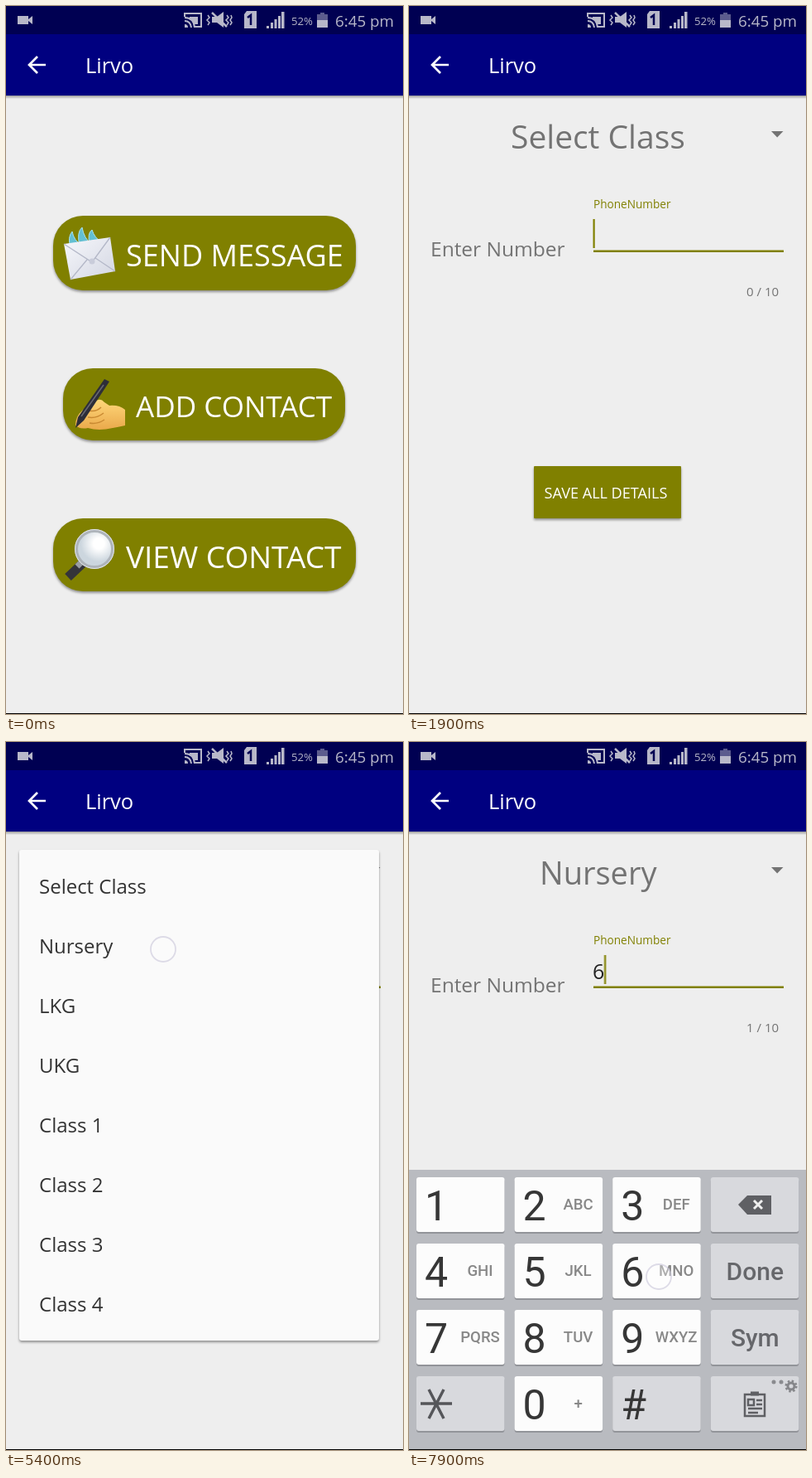
Animation, 480 px wide and 854 px high, one loop 8 s. Source, as an HTML page:

```html
<!DOCTYPE html>
<html lang="en">
<head>
<meta charset="utf-8">
<title>Contact form</title>
<style>
html, body { margin: 0; width: 100%; height: 100%; overflow: hidden; background: #eee; }
svg { display: block; width: 100vw; height: 100vh; }
text { font-family: "Open Sans", "Noto Sans", sans-serif; white-space: pre; }
.olive { fill: #808000; }
.raised { filter: drop-shadow(0 2px 1.5px rgba(0, 0, 0, .4)); }
.grey { fill: #737373; }
.status { fill: #b8b8c9; }
.line { fill: none; stroke: #b8b8c9; stroke-width: 2; }
.key text { font-family: Roboto, "Noto Sans", sans-serif; }
.digit { font-size: 50px; fill: #363636; }
.letters { font-size: 18.6px; font-weight: 500; fill: #888; text-anchor: middle; }
.word { font-size: 30px; font-weight: 500; fill: #66676b; text-anchor: middle; }

/* One step of 100 ms is 1.25 % */
.anim { animation: 8s step-end infinite; }
#form { opacity: 0; animation-name: form; }
#hint { font-size: 25px; fill: #8c8c8c; transform: translate(223px, 285px); animation-name: hint; }
#caret { animation-name: caret; }
#choice0 { animation-name: leaveChoice; }
#choice1 { opacity: 0; animation-name: enterChoice; }
#snack { transform: translateY(61px); animation-name: snack; }
#snackText { opacity: 0; animation-name: snackText; }
#popup { opacity: 0; animation-name: popup; }
#keyboard { opacity: 0; animation-name: keyboard; }
.before { animation-name: leaveTyped; }
.after { opacity: 0; animation-name: enterTyped; }
#touch { opacity: 0; animation-name: touch; }

@keyframes form {
  0% { opacity: 0; }
  10% { opacity: .5; transform: translateY(36px); }
  11.25% { opacity: 1; transform: none; }
}
@keyframes hint {
  12.5% { transform: translate(223px, 279px) scale(.88); }
  13.75% { transform: translate(223px, 244px) scale(.544); fill: #808000; }
}
@keyframes caret {
  0%, 23.75%, 36.25%, 48.75%, 71.25%, 81.25%, 96.25% { opacity: 1; }
  17.5%, 30%, 42.5%, 55%, 77.5%, 90% { opacity: 0; }
  97.5% { transform: translateX(13.5px); }
}
@keyframes leaveChoice { 71.25% { opacity: 0; } }
@keyframes enterChoice { 71.25% { opacity: 1; } }
@keyframes leaveTyped { 97.5% { opacity: 0; } }
@keyframes enterTyped { 97.5% { opacity: 1; } }
@keyframes snack {
  33.75% { transform: translateY(18px); }
  35% { transform: none; }
  55% { transform: translateY(1px); }
  56.25% { transform: translateY(36px); }
  57.5% { transform: translateY(58px); }
  58.75% { transform: translateY(61px); }
}
@keyframes snackText {
  33.75% { opacity: .3; }
  35% { opacity: .85; }
  36.25% { opacity: 1; }
  55% { opacity: .9; }
  56.25% { opacity: 0; }
}
@keyframes popup {
  57.5% { opacity: .6; }
  58.75% { opacity: 1; }
  70% { opacity: .4; }
  71.25% { opacity: 0; }
}
@keyframes keyboard {
  82.5% { opacity: .5; transform: translateY(24px); }
  83.75% { opacity: .93; transform: translateY(1.5px); }
  85% { opacity: 1; transform: none; }
}
@keyframes touch {
  7.5% { opacity: 1; transform: translate(250px, 482px); }
  10% { opacity: 0; }
  32.5% { opacity: .6; transform: translate(282px, 587px); }
  36.25% { opacity: 0; }
  53.75% { opacity: 1; transform: translate(431px, 161px); }
  57.5% { opacity: 0; }
  67.5% { opacity: 1; transform: translate(190px, 250px); }
  70% { opacity: 0; }
  80% { opacity: 1; transform: translate(338px, 276px); }
  82.5% { opacity: 0; }
  96.25% { opacity: 1; transform: translate(302px, 645px); }
}
</style>
</head>
<body>
<svg viewBox="0 0 480 854" preserveAspectRatio="none">
  <defs>
    <linearGradient id="shade" x2="0" y2="1">
      <stop stop-opacity=".35"/><stop offset="1" stop-opacity="0"/>
    </linearGradient>
    <linearGradient id="paper" x2="1" y2="1">
      <stop stop-color="#f7f8fc"/><stop offset="1" stop-color="#d3d6e2"/>
    </linearGradient>
    <linearGradient id="skin" x2="0" y2="1">
      <stop stop-color="#ffd77a"/><stop offset="1" stop-color="#eaa94b"/>
    </linearGradient>
    <radialGradient id="lens" cx=".62" cy=".35">
      <stop offset=".3" stop-color="#fff"/><stop offset="1" stop-color="#ccd6de"/>
    </radialGradient>
  </defs>
  <rect width="480" height="854" fill="#eee"/>

  <g id="menu">
    <g class="olive raised">
      <rect x="57" y="253" width="366" height="90" rx="36"/>
      <rect x="69" y="437" width="341" height="87" rx="36"/>
      <rect x="57" y="618" width="366" height="88" rx="36"/>
    </g>
    <g fill="#fff">
      <text x="145" y="314" font-size="36">SEND MESSAGE</text>
      <text x="157" y="496" font-size="35">ADD CONTACT</text>
      <text x="145" y="678" font-size="37">VIEW CONTACT</text>
    </g>
    <g>
      <path d="M78 291Q74 279 80 272Q82 283 92 289ZM89 289Q85 273 92 267Q94 280 104 288ZM101 287Q98 274 104 270Q107 280 116 285Z" fill="#63bfd2" stroke="#a9e2ec"/>
      <path d="M70 287L126 279L132 320L78 330Z" fill="url(#paper)"/>
      <path d="M70 287L104 309L126 279M78 330L98 306M132 320L108 304" fill="none" stroke="#b4b8c8" stroke-width="1.3"/>
      <circle cx="104" cy="308" r="3.5" fill="#c9ccda"/>
    </g>
    <g>
      <path d="M84 506Q84 495 92 488L108 477Q114 472 119 478L125 482Q137 481 144 487V506Q135 508 129 509Q112 513 99 509Q90 511 84 506Z" fill="url(#skin)"/>
      <path d="M100 488Q109 490 115 484M99 496Q109 498 118 491M101 503Q110 505 119 499" fill="none" stroke="#c98932" stroke-width="1.5"/>
      <path d="M119 450L125 453L94 500L84 509L87 496Z" fill="#2e2e38"/>
      <path d="M118 457L91 495" stroke="#686874" stroke-width="1.5"/>
    </g>
    <g>
      <path d="M94 671L75 689" stroke="#34343a" stroke-width="11"/>
      <path d="M94 668L86 676" stroke="#9a9da3" stroke-width="7"/>
      <circle cx="107" cy="655" r="22" fill="url(#lens)" stroke="#aeb4ba" stroke-width="4"/>
      <circle cx="107" cy="655" r="23.5" fill="none" stroke="#e4e7ea"/>
    </g>
  </g>

  <g id="form" class="anim">
    <rect y="108" width="480" height="790" fill="#eee"/>
    <g class="grey">
      <text id="choice0" class="anim" x="123" y="172" font-size="39">Select Class</text>
      <text id="choice1" class="anim" x="158" y="172" font-size="38">Nursery</text>
      <path d="M438 151H452.500L445.200 158.500Z"/>
      <text x="26" y="302" font-size="24.500">Enter Number</text>
      <g font-size="15">
        <text class="anim before" x="408" y="350">0 / 10</text>
        <text class="anim after" x="408" y="350">1 / 10</text>
      </g>
    </g>
    <text id="hint" class="anim">PhoneNumber</text>
    <text class="anim after" x="222" y="286" font-size="25" fill="#222">6</text>
    <rect class="olive" x="223" y="294.500" width="230" height="2.500"/>
    <rect id="caret" class="olive anim" x="222.500" y="257" width="2.200" height="35"/>
    <rect class="olive raised" x="151" y="555" width="178" height="63" rx="1"/>
    <text x="163.500" y="594" font-size="18.100" fill="#fff">SAVE ALL DETAILS</text>
  </g>

  <g id="snack" class="anim">
    <rect class="olive" y="793" width="480" height="61"/>
    <text id="snackText" class="anim" x="31" y="832" font-size="17.700" fill="#eeeed8">Check details again</text>
  </g>

  <g id="popup" class="anim">
    <rect class="raised" x="16" y="130" width="435" height="592" rx="3" fill="#fafafa"/>
    <g id="options" font-size="24" fill="#333"></g>
  </g>

  <g id="keyboard" class="anim">
    <rect y="516" width="480" height="400" fill="#b9bbc0"/>
    <g id="keys"></g>
    <g stroke="#55565a" stroke-width="3.500">
      <path d="M14 798H52M24 781L42 816M42 781L24 816"/>
    </g>
    <path d="M398 558L409 547H438V570H409Z" fill="#5f6064"/>
    <path d="M417 553L427 563M427 553L417 563" stroke="#eee" stroke-width="3"/>
    <g fill="none" stroke="#5f6064" stroke-width="2.500">
      <path d="M406 787H430V813H406ZM410 793H417V800H410ZM420 794H427M420 799H427M410 804H427M410 809H422"/>
      <path d="M413 786H423" stroke-width="5"/>
    </g>
    <g fill="#8a8b8f">
      <circle cx="441" cy="772" r="2.500"/>
      <circle cx="450" cy="772" r="2.500"/>
    </g>
    <circle cx="462" cy="777" r="4" fill="none" stroke="#85868a" stroke-width="3"/>
    <circle cx="462" cy="777" r="6.300" fill="none" stroke="#85868a" stroke-width="2.500" stroke-dasharray="2.470"/>
  </g>

  <g id="header">
    <rect width="480" height="34" fill="#000052"/>
    <rect y="34" width="480" height="74" fill="#000080"/>
    <rect y="108" width="480" height="4" fill="url(#shade)"/>
    <path d="M48 71H29M38 61L28 71L38 81" fill="none" stroke="#fff" stroke-width="2.700"/>
    <text x="96" y="81" font-size="25.500" fill="#fff">Lirvo</text>
    <g class="status">
      <path d="M14 12H27V16L32 12V22L27 18V22H14Z"/>
      <path d="M216 26V22A4 4 0 0 1 220 26Z"/>
      <path d="M222 13H232V22H227Q225 17 222 16Z"/>
      <path d="M249 13H255L263 7V26L255 20H249Z"/>
      <path d="M291 6H303V27H288V10Z"/>
      <path d="M315 24H318V27H315ZM320 20H323V27H320ZM324.500 16H327.500V27H324.500ZM329 12H332V27H329ZM333 7H336.500V27H333Z"/>
      <path d="M380 8H385V10H389V26H376V10H380Z" opacity=".5"/>
      <path d="M376 17H389V26H376Z"/>
      <text x="345" y="23" font-size="13.200">52%</text>
      <text x="398" y="25" font-size="18.800">6:45 pm</text>
    </g>
    <g class="line">
      <path d="M216 13V9H236V25H228M216 18Q223 18 224 26M216 14Q227 14 228 26"/>
      <path d="M249 8L267 25" stroke-width="2.500"/>
      <path d="M244 11L246 14L243 17L246 20L244 23M267 11L269 14L266 17L269 20L267 23M272 11L273 14L271 17L273 20L271 23" stroke-width="1.500"/>
    </g>
    <path d="M292 14L296 11V23" fill="none" stroke="#000052" stroke-width="2.500"/>
  </g>

  <rect y="853" width="480" height="1"/>
  <g id="touch" class="anim">
    <circle r="15" fill="#fff" fill-opacity=".3" stroke="#c8c4d8" stroke-opacity=".6" stroke-width="1.800"/>
  </g>
</svg>
<script>
const byId = id => document.getElementById(id);

const options = ["Select Class", "Nursery", "LKG", "UKG", "Class 1", "Class 2", "Class 3", "Class 4"];
byId("options").innerHTML = options
  .map((name, i) => `<text x="40" y="${183 + i * 72}">${name}</text>`).join("");

// Each key: main label and, on number keys, its letters
const rows = [
  [["1"], ["2", "ABC"], ["3", "DEF"], [""]],
  [["4", "GHI"], ["5", "JKL"], ["6", "MNO"], ["Done"]],
  [["7", "PQRS"], ["8", "TUV"], ["9", "WXYZ"], ["Sym"]],
  [[""], ["0", "+"], ["#"], [""]]
];

function key([label, letters = ""], col, row) {
  const x = 9 + col * 118.6, y = 525 + row * 80;
  const fill = /\d/.test(label) ? "#fcfcfc" : "#d8d9dd";
  const main = label.length > 1
    ? `<text class="word" x="${x + 53.5}" y="${y + 124 - 80}">${label}</text>`
    : `<text class="digit" x="${x + 10}" y="${y + 52}">${label}</text>`;
  return `<g class="key">
    <rect x="${x}" y="${y + 2}" width="106.500" height="66" rx="3" fill="#929499"/>
    <rect x="${x}" y="${y}" width="106.500" height="66" rx="3" fill="${fill}"/>
    ${main}<text class="letters" x="${x + 77}" y="${y + 39}">${letters}</text></g>`;
}

byId("keys").innerHTML = rows
  .map((row, r) => row.map((k, c) => key(k, c, r)).join("")).join("");
</script>
</body>
</html>
```
